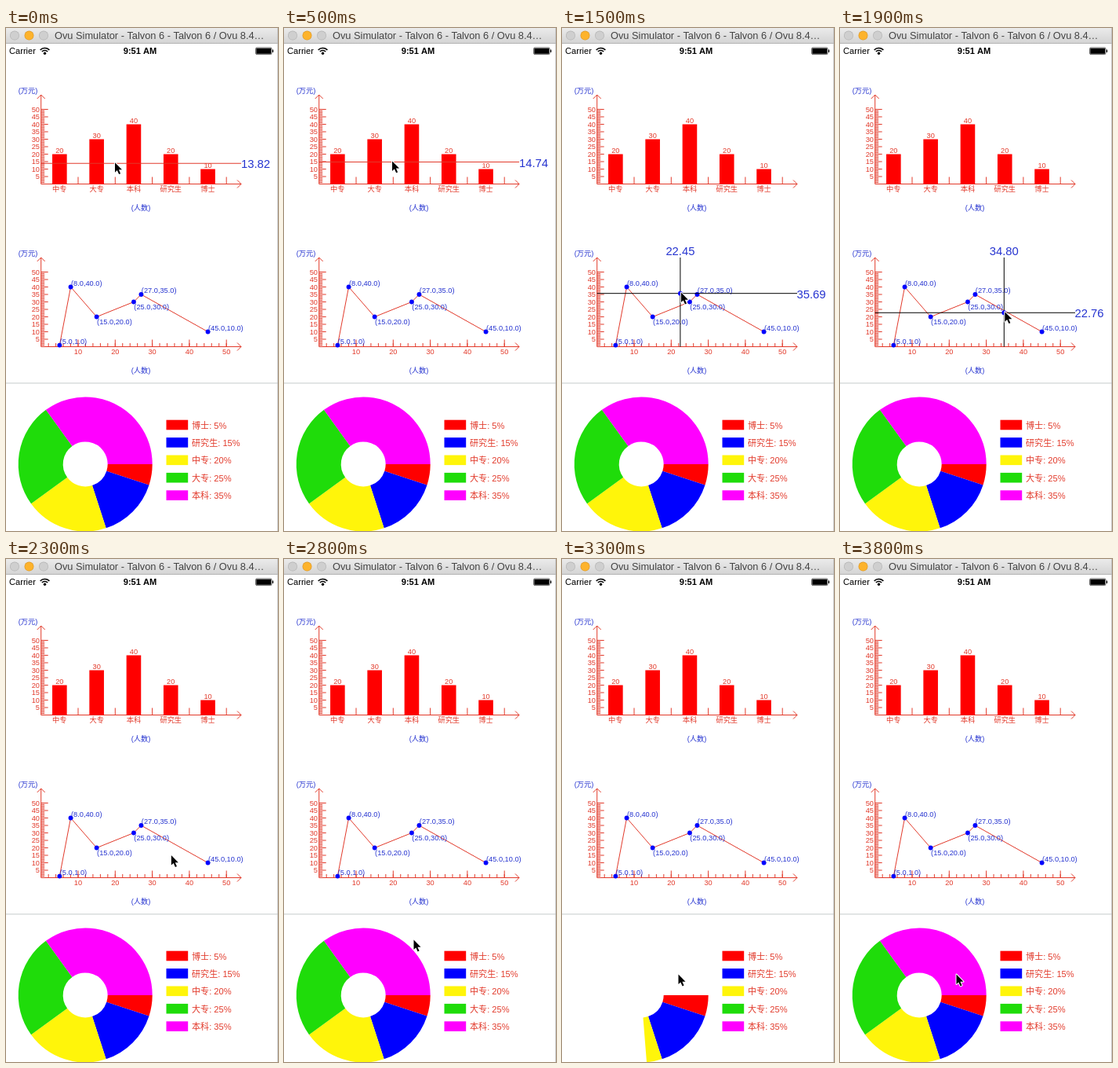
An HTML page with a canvas for the animation above (3.9 s loop, 347 by 640 pixels).

```html
<!DOCTYPE html>
<html lang="zh">
<head>
<meta charset="utf-8">
<style>
  html, body { margin: 0; width: 100%; height: 100%; overflow: hidden; background: #fff; }
  canvas { display: block; width: 347px; height: 640px; }
</style>
</head>
<body>
<canvas id="stage"></canvas>
<script>
const canvas = document.getElementById('stage');
const g = canvas.getContext('2d');
const scale = window.devicePixelRatio || 1;
canvas.width = 347 * scale;
canvas.height = 640 * scale;

const LOOP = 3900, STEP = 100;
const RED = '#e23a2b', BLUE = '#2634d0';
const SMALL = 9.25, LARGE = 14.8;
const LEFT = 44.7, RIGHT = 300, STEP_X = 4.73, STEP_Y = 1.9;
const BAR_BASE = 198.5, LINE_BASE = 405.5;

const bars = [['中专', 20], ['大专', 30], ['本科', 40], ['研究生', 20], ['博士', 10]];
const points = [[5, 1], [8, 40], [15, 20], [25, 30], [27, 35], [45, 10]];
const slices = [
  ['博士', 5, '#f00'], ['研究生', 15, '#00f'], ['中专', 20, '#fff50a'],
  ['大专', 25, '#1fdc0a'], ['本科', 35, '#f0f']
];

// Pointer path: time, x, y
const path = [
  [0, 138.5, 170.64], [300, 139, 160], [600, 137, 172], [1000, 133.5, 337], [1150, 133.5, 337],
  [1500, 151.4, 336.09], [1900, 209.8, 360.65], [2200, 214, 368],
  [2800, 165, 484], [3000, 148, 528], [LOOP, 148, 528]
];
const barDrag = [0, 600], lineDrag = [1200, 2200];
const SWEEP_START = 3110, SWEEP_TIME = 600;

const smooth = p => p * p * (3 - 2 * p);
const during = (t, [from, to]) => t >= from && t < to;

function pointerAt(t) {
  const i = path.findIndex(key => key[0] > t);
  const [t0, x0, y0] = path[i - 1], [t1, x1, y1] = path[i];
  const p = smooth((t - t0) / (t1 - t0));
  return [x0 + (x1 - x0) * p, y0 + (y1 - y0) * p];
}

function text(str, x, y, color, size = SMALL, align = 'center', weight = '') {
  g.font = `${weight} ${size}px "Liberation Sans", "Noto Sans CJK SC", sans-serif`;
  g.textAlign = align;
  g.fillStyle = color;
  g.fillText(str, x, y + size * 0.36);
}

function line(color, ...xy) {
  g.beginPath();
  for (let i = 0; i < xy.length; i += 2) g.lineTo(xy[i], xy[i + 1]);
  g.strokeStyle = color;
  g.lineWidth = 1;
  g.stroke();
}

function rect(color, x, y, w, h) {
  g.fillStyle = color;
  g.fillRect(x, y, w, h);
}

function dot(color, x, y, r) {
  g.beginPath();
  g.arc(x, y, r, 0, 2 * Math.PI);
  g.fillStyle = color;
  g.fill();
}

function windowBars() {
  const shade = g.createLinearGradient(0, 0, 0, 20);
  shade.addColorStop(0, '#ebebeb');
  shade.addColorStop(1, '#d3d3d3');
  rect(shade, 0, 0, 347, 20);
  rect('#b4b4b4', 0, 19, 347, 1);
  ['#cfcfcf', '#fdb32c', '#cfcfcf'].forEach((color, i) => {
    dot(i === 1 ? '#dd9a2c' : '#b5b5b5', 11 + i * 18.5, 9.5, 6);
    dot(color, 11 + i * 18.5, 9.5, 5.3);
  });
  text('Ovu Simulator - Talvon 6 - Talvon 6 / Ovu 8.4…', 62, 9.7, '#444', 12.8, 'left');

  text('Carrier', 4, 29.5, '#000', 11.1, 'left');
  text('9:51 AM', 171, 29.5, '#000', 11.1, 'center', 'bold');
  g.strokeStyle = '#000';
  g.lineWidth = 1.6;
  for (const r of [5, 8]) {
    g.beginPath();
    g.arc(49.5, 33.5, r, -Math.PI * 0.76, -Math.PI * 0.24);
    g.stroke();
  }
  dot('#000', 49.5, 32.3, 1.7);
  g.beginPath();
  g.roundRect(318.5, 25, 20.5, 8.6, 1.5);
  g.lineWidth = 0.6;
  g.stroke();
  rect('#000', 319.3, 25.8, 18.9, 7);
  rect('#000', 339.8, 27.6, 1.3, 3.3);
}

function axes(base) {
  const top = base - 113.5;
  line(RED, LEFT, base, LEFT, top);
  line(RED, LEFT - 5, top + 5, LEFT, top, LEFT + 5, top + 5);
  line(RED, LEFT, base, RIGHT, base);
  line(RED, RIGHT - 5, base - 5, RIGHT, base, RIGHT - 5, base + 5);
  for (let v = 1; v <= 50; v++) {
    const y = base - v * STEP_Y, major = v % 5 === 0;
    line(RED, LEFT, y, LEFT + (major ? 9 : 4.5), y);
    if (major) text(v, 43, y, RED, SMALL, 'right');
  }
  for (let v = 10; v <= 50; v += 10) {
    const x = LEFT + v * STEP_X;
    line(RED, x, base, x, base - 9);
  }
  text('(万元)', 28, base - 118.5, BLUE);
  text('(人数)', 172, base + 30.5, BLUE);
}

function barChart() {
  axes(BAR_BASE);
  bars.forEach(([name, value], i) => {
    const x = LEFT + (5 + i * 10) * STEP_X, h = value * STEP_Y;
    rect('#f00', x - 9.3, BAR_BASE - h, 18.6, h);
    text(value, x, BAR_BASE - h - 4.5, RED);
    text(name, x, BAR_BASE + 6, RED);
  });
}

function lineChart() {
  axes(LINE_BASE);
  for (let v = 2; v <= 50; v += 2) {
    const x = LEFT + v * STEP_X;
    line(RED, x, LINE_BASE, x, LINE_BASE - 4.5);
    if (v % 10 === 0) text(v, x, LINE_BASE + 6, RED);
  }
  const placed = points.map(([a, b]) => [LEFT + a * STEP_X, LINE_BASE - b * STEP_Y]);
  line(RED, ...placed.flat());
  placed.forEach(([x, y], i) => {
    const below = i === 2 || i === 3;
    const label = points[i].map(v => v.toFixed(1)).join();
    dot('#00f', x, y, 2.9);
    text(`(${label})`, x + 0.4, y + (below ? 6 : -5), BLUE, SMALL, 'left');
  });
}

function crosshair(t, x, y) {
  const value = base => ((base - y) / STEP_Y).toFixed(2);
  if (during(t, barDrag)) {
    line(RED, LEFT, y, RIGHT, y);
    text(value(BAR_BASE), RIGHT, y + 0.8, BLUE, LARGE, 'left');
  } else if (during(t, lineDrag)) {
    line('#000', LEFT, y, RIGHT, y);
    line('#000', x, LINE_BASE, x, LINE_BASE - 113.5);
    dot('#00f', x, y, 2.9);
    text(value(LINE_BASE), RIGHT - 0.5, y + 0.6, BLUE, LARGE, 'left');
    text(((x - LEFT) / STEP_X).toFixed(2), x, LINE_BASE - 121.8, BLUE, LARGE);
  }
}

function pie(t) {
  const p = (t - SWEEP_START) / SWEEP_TIME;
  const shown = p > 0 && p < 1 ? smooth(p) * 100 : 100;
  const angle = percent => percent / 50 * Math.PI;
  let from = 0;
  slices.forEach(([name, share, color], i) => {
    const to = Math.min(from + share, shown);
    if (to > from) {
      g.beginPath();
      g.arc(101.2, 555, 57, angle(from), angle(to));
      g.strokeStyle = color;
      g.lineWidth = 57;
      g.stroke();
    }
    from += share;
    const y = 505 + i * 22.4;
    rect(color, 204.5, y - 6.3, 27.7, 12.6);
    text(`${name}: ${share}%`, 237, y + 0.7, RED, 11.1, 'left');
  });
}

function pointer(x, y) {
  g.save();
  g.translate(x, y);
  g.lineJoin = 'round';
  g.lineWidth = 2;
  g.strokeStyle = '#fff';
  g.fillStyle = '#000';
  const arrow = new Path2D('M.5 .5V13l2.8-2.6L5.6 15.4l2-.9-2.2-4.8H9.5Z');
  g.stroke(arrow);
  g.fill(arrow);
  g.restore();
}

function draw(t) {
  const [x, y] = pointerAt(t);
  g.setTransform(scale, 0, 0, scale, 0, 0);
  rect('#fff', 0, 0, 347, 640);
  windowBars();
  barChart();
  lineChart();
  rect('#c5cbcb', 0, 451.4, 347, 1);
  pie(t);
  rect('#b0b0b0', 346.3, 0, 0.7, 640);
  crosshair(t, x - 0.5, y + 1.6);
  pointer(x, y);
}

const start = performance.now();
function tick() {
  const steps = Math.floor((performance.now() - start) / STEP + 0.1);
  draw(steps * STEP % LOOP);
  requestAnimationFrame(tick);
}
tick();
</script>
</body>
</html>
```
